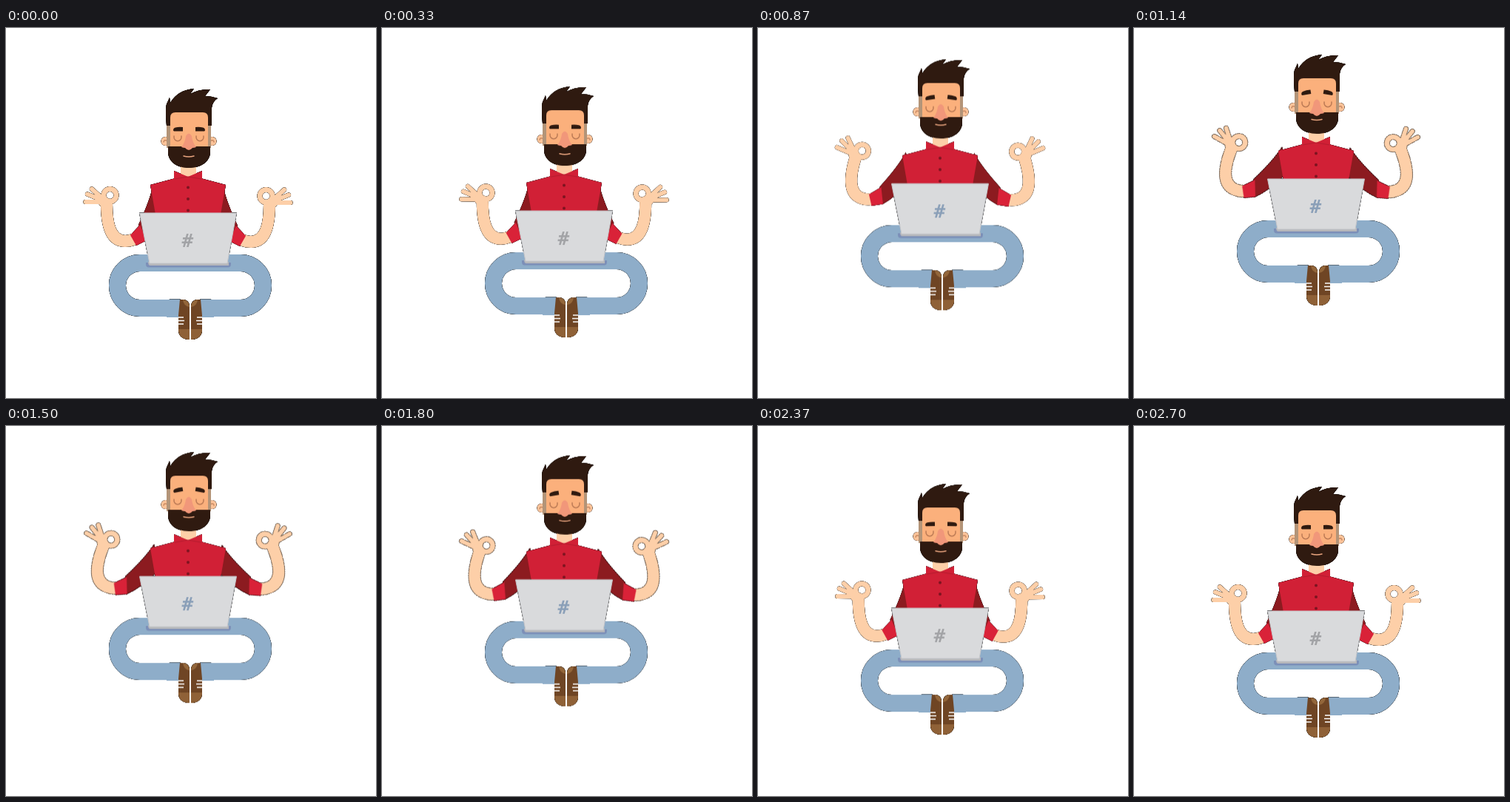
Recreate the animation shown at these times as an HTML page. Size 500x500 px, loop 2.76 s.

```html
<!DOCTYPE html>
<html lang="en">
<head>
<meta charset="utf-8">
<title>Floating meditation</title>
<style>
  html, body { margin: 0; height: 100%; overflow: hidden; background: #fff; }
  svg { display: block; width: 100vw; height: 100vh; }
  #man { filter: drop-shadow(0 0 .5px #000) drop-shadow(0 0 .4px #000); }
  .skin { fill: #fdcfa8; }
  .limb { fill: none; stroke: #fdcfa8; stroke-linecap: round; }
  .dark { fill: #2f1a10; }
  .line { fill: none; stroke-width: 1.5; stroke-linecap: round; }
</style>
</head>
<body>
<svg viewBox="0 0 500 500">
  <g id="man">
    <!-- legs and shoes -->
    <path d="M234 378.5H181A30.5 30.5 0 0 1 181 317.5H317A30.5 30.5 0 0 1 317 378.5H264" fill="none" stroke="#8eadc9" stroke-width="23"/>
    <path d="M217 368L222 366.5H236V391H217ZM281 368L276 366.5H262V391H281Z" fill="#8eadc9"/>
    <g id="shoe">
      <path d="M235 367H240Q248 368 248 377V421H247Q233 420 233 407V388Z" fill="#6f4524"/>
      <path d="M239 367Q248 368 248 377Q240 376 239 367Z" fill="#93663a"/>
      <path d="M233 407H248V421H247Q233 420 233 407Z" fill="#8f6137"/>
      <path d="M233 391H240M233 395.5H241M233 400H240" stroke="#fff" stroke-width="1.6"/>
    </g>
    <use href="#shoe" transform="translate(498) scale(-1 1)"/>

    <!-- arms -->
    <g id="side">
      <g id="arm">
        <path class="limb" d="M136 238C136 265 141 288 161 288Q172 288 181 280" stroke-width="16"/>
        <g id="hand" class="limb" stroke-width="6">
          <path d="M107.500 235L132 235M110 224.500L131 233M116 217.500L131 231"/>
          <circle cx="140.500" cy="226" r="8.500" stroke-width="7"/>
          <circle class="skin" cx="132" cy="235" r="4"/>
        </g>
        <path d="M199 211Q195 232 179 266L189 288Q206 270 216 245Z" fill="#8c1b20"/>
        <path d="M168 280L181 266L190 287L176 294Z" fill="#d92238"/>
      </g>
    </g>
    <use href="#side" transform="translate(492 1) scale(-1 1)"/>

    <!-- torso -->
    <path class="skin" d="M236 183H257V198L246 203L236 198Z"/>
    <path d="M195 212L227 203.500V193L246 201L265 193V203.500L297 212L290 252H202Z" fill="#d12036"/>
    <path d="M228 204L246 201L264 204" fill="none" stroke="#b51c2f"/>
    <g fill="#7c1420">
      <circle cx="246" cy="215.500" r="2"/><circle cx="246" cy="231" r="2"/><circle cx="246" cy="246.500" r="2"/>
    </g>

    <!-- head -->
    <g fill="#fdc49a">
      <circle cx="215.500" cy="153" r="6"/><circle cx="278.500" cy="153" r="6"/>
    </g>
    <path class="line" d="M213 154Q214 150 218 153M281 154Q280 150 276 153" stroke="#c98a63"/>
    <path d="M217 126H277V162H217Z" fill="#b39478"/>
    <path class="dark" d="M217 132Q215 110 217 103L221 94L222 101Q232 84 254 82L249 89Q262 82 276 83L269 92Q277 92 286 95Q279 99 278 108V132Z"/>
    <path d="M222 162V121Q222 114 229 114H266Q273 114 273 121V162Z" fill="#fbb07c"/>
    <path class="dark" d="M219 160H276V167C276 181 263 189 247 189S219 181 219 167Z"/>
    <path d="M237 161Q242 155 243 146Q247 139 251 146Q252 155 257 161Q254 162 252 162Q247 168 242 162Q240 162 237 161Z" fill="#f1977a"/>
    <path class="line" d="M227 146C226 155 238 155 237 146M257 146C256 155 268 155 267 146" stroke="#bb7a55"/>
    <g id="face">
      <path class="dark" id="leftBrow" d="M226 138.500Q226 135 229 134.500Q233 133.500 239 134V139.500H227Z"/>
      <path class="dark" id="rightBrow" d="M269 138.500Q269 135 266 134.500Q262 133.500 256 134V139.500H268Z"/>
      <path class="line" d="M240 173Q247 175 254 173" stroke="#eaa57f"/>
    </g>

    <!-- laptop -->
    <path d="M189 317H304V319Q304 323.500 300 323.500H193Q189 323.500 189 319Z" fill="#7c8fb8"/>
    <path d="M192 316H301V321H195Q192 321 192 316Z" fill="#b6b7bb"/>
    <path d="M180.500 250H311.500L299 318H194Z" fill="#d9dadc" stroke="#c6c7ca"/>
    <text id="mark" x="245" y="296" text-anchor="middle" font-family="'Open Sans', sans-serif" font-style="italic" font-weight="700" font-size="25">#</text>
  </g>
</svg>
<script>
  const LOOP = 2760, TRAVEL = 1340, FALL_START = 1400, HEIGHT = 47;
  const [man, arm, hand, face, leftBrow, rightBrow, mark] =
    ['man', 'arm', 'hand', 'face', 'leftBrow', 'rightBrow', 'mark'].map(id => document.getElementById(id));

  // cubic-bezier(.69, 0, .31, 1)
  function ease(u) {
    if (u <= 0) return 0;
    if (u >= 1) return 1;
    let low = 0, high = 1, s;
    for (let i = 0; i < 24; i++) {
      s = (low + high) / 2;
      const r = 1 - s;
      const x = 3 * .69 * s * r * r + 3 * .31 * s * s * r + s * s * s;
      if (x < u) low = s; else high = s;
    }
    return s * s * (3 - 2 * s);
  }

  const move = (part, transform) => part.setAttribute('transform', transform);

  function draw() {
    const t = performance.now() % LOOP;
    const lift = ease(t / TRAVEL) - ease((t - FALL_START) / TRAVEL);
    const swing = lift ** 1.5; // arms trail the body
    move(man, `translate(0 ${-HEIGHT * lift})`);
    move(arm, `rotate(${22 * swing} 211 212)`);
    move(hand, `rotate(${8 * swing} 136 240)`);
    move(face, `translate(0 ${-3.5 * lift})`);
    move(leftBrow, `rotate(${-10 * lift} 232.5 137)`);
    move(rightBrow, `rotate(${10 * lift} 262.5 137)`);
    mark.setAttribute('fill', lift > .65 ? '#8a9fb8' : '#a2a3a6');
    requestAnimationFrame(draw);
  }
  draw();
</script>
</body>
</html>
```
